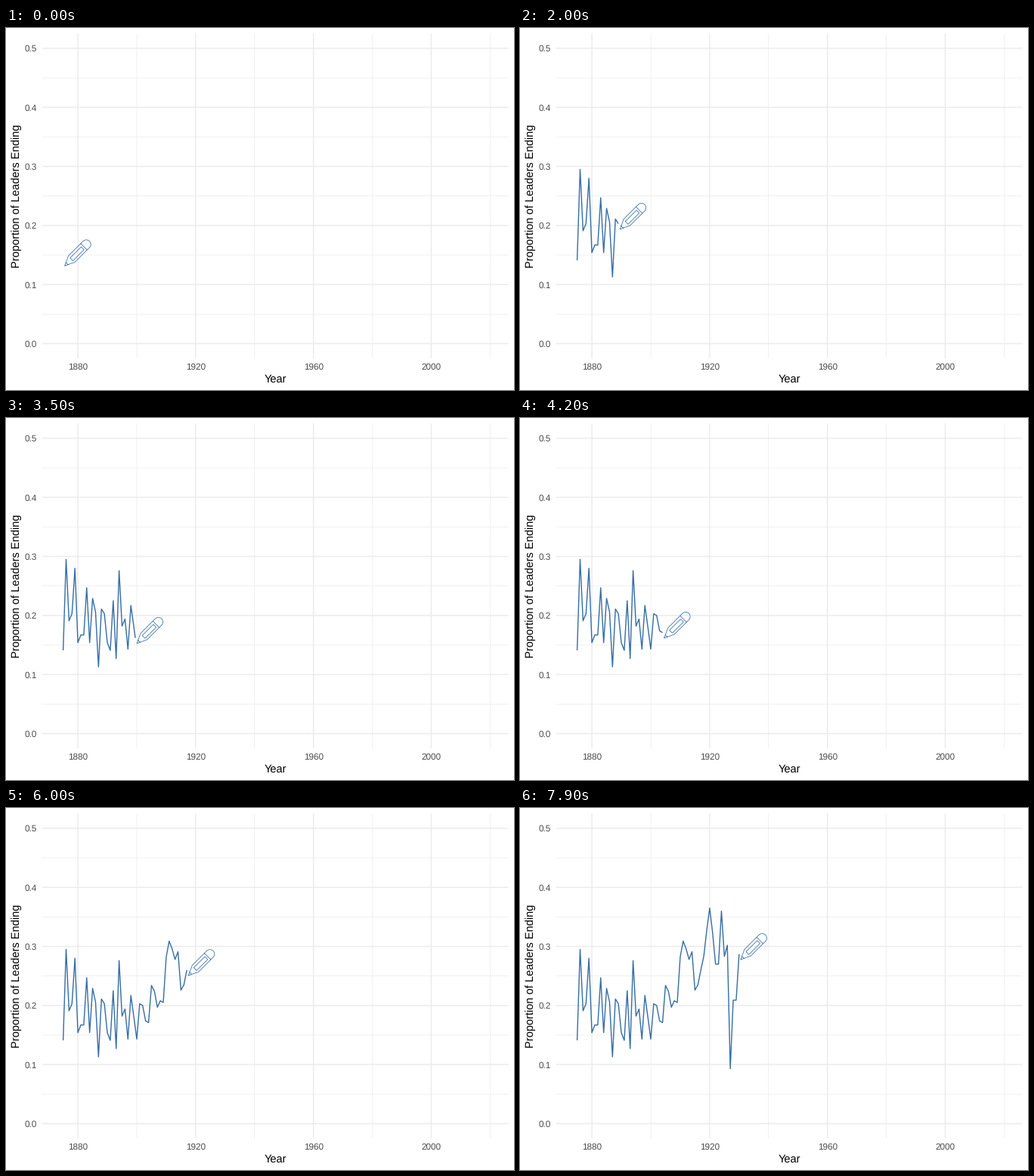
These frames come from a looping animation (672x480 px, 8000 ms). A matplotlib script:

```python
import numpy as np
import matplotlib
import matplotlib.pyplot as plt
from matplotlib.animation import FuncAnimation
from matplotlib.patches import PathPatch
from matplotlib.path import Path
from matplotlib.transforms import Affine2D

W, H, DPI = 672, 480, 96
FRAMES, STEP = 80, 100
FRAMES_PER_YEAR = 1.4317
LEFT, RIGHT, TOP, BOTTOM = 47.6, 664.7, 7.3, 438.1
START = 1875
BLUE, GRID, LABEL = "#386fa6", "#ebebeb", "#4d4d4d"

matplotlib.rcParams["font.family"] = "Liberation Sans"
matplotlib.rcParams["text.hinting"] = "none"
matplotlib.rcParams["path.simplify"] = False

# Yearly proportions in thousandths, from 1875 on
RATES = np.array([
    141, 295, 191, 203, 280, 154, 167, 167, 247, 154,
    229, 206, 113, 211, 203, 154, 141, 225, 127, 276,
    182, 194, 143, 217, 181, 143, 203, 200, 174, 171,
    234, 224, 197, 208, 205, 282, 309, 296, 278, 291,
    226, 235, 260, 283, 327, 365, 323, 270, 270, 360,
    283, 302, 93, 209, 209, 287,
]) / 1000


def px(year):
    return 75.6 + 3.8952 * (year - START)


def py(rate):
    return 418.5 - 783.2 * rate


def pt(pixels):
    return pixels * 72 / DPI


fig = plt.figure(figsize=(W / DPI, H / DPI), dpi=DPI, facecolor="white")
ax = fig.add_axes([0, 0, 1, 1])
ax.set_xlim(0, W)
ax.set_ylim(H, 0)
ax.axis("off")


def rule(xs, ys, width):
    ax.plot(xs, ys, color=GRID, lw=pt(width), solid_capstyle="butt",
            snap=False, zorder=1)


def label(x, y, text, size=8.8, color=LABEL, ha="center", angle=0):
    ax.text(x, y, text, fontsize=size, color=color, ha=ha, va="baseline",
            rotation=angle, rotation_mode="anchor")


for i in range(10):
    rate = i * 0.05 + 0.05 * (i % 2 == 0) * 0
    rule([LEFT, RIGHT], [py(rate)] * 2, 0.71 if i % 2 else 1.42)
rule([LEFT, RIGHT], [py(0.5)] * 2, 1.42)
for i, year in enumerate(range(1880, 2021, 20)):
    rule([px(year)] * 2, [TOP, BOTTOM], 0.71 if i % 2 else 1.42)

for i in range(6):
    label(41.1, py(i / 10) + 4.2, f"{i / 10:.1f}", ha="right")
for year in range(1880, 2001, 40):
    label(px(year), 453.1, str(year))
label((LEFT + RIGHT) / 2, 469.5, "Year", 11, "black")
label(17.9, (TOP + BOTTOM) / 2, "Proportion of Leaders Ending", 11, "black",
      angle=90)


def pencil_path():
    """Pencil outline along +x with its tip at the origin."""
    r, neck, cap, end = 6, 13, 36, 40.4
    a = np.linspace(np.pi / 2, -np.pi / 2, 25)
    dome = np.column_stack([end + r * np.cos(a), r * np.sin(a)])
    body = Path.make_compound_path(
        Path([(0, 0), (4.6, 2.1), (9.5, 4.2), (neck, r)],
             [Path.MOVETO, Path.LINETO, Path.CURVE3, Path.CURVE3]),
        Path(np.vstack([[(neck, r)], dome, [(neck, -r)]])),
        Path([(neck, -r), (9.5, -4.2), (4.6, -2.1), (0, 0)],
             [Path.MOVETO, Path.CURVE3, Path.CURVE3, Path.LINETO]),
        Path([(4.6, 2.1), (4.1, 0), (4.6, -2.1)]),
        Path([(cap, r), (cap, -r)]),
        Path([(12.5, 2.4), (33.4, 2.4), (33.4, -2.9), (12.5, -2.9),
              (12.5, 2.4)]),
    )
    return body.transformed(Affine2D().rotate_deg(45).scale(1, -1))


line, = ax.plot([], [], color=BLUE, lw=pt(1.42), solid_capstyle="butt",
                solid_joinstyle="round", snap=False, zorder=3)
pencil = PathPatch(pencil_path(), facecolor="none", edgecolor=BLUE,
                   lw=pt(0.8), snap=False, zorder=4)
ax.add_patch(pencil)

years = np.arange(len(RATES))
keys = np.round(years * FRAMES_PER_YEAR)
xs, ys = px(START + years), py(RATES)


def draw(frame):
    x, y = np.interp(frame, keys, xs), np.interp(frame, keys, ys)
    past = keys <= frame
    line.set_data(np.append(xs[past], x), np.append(ys[past], y))
    pencil.set_transform(Affine2D().translate(x + 2, y + 7.4) + ax.transData)
    return line, pencil


anim = FuncAnimation(fig, draw, frames=FRAMES, interval=STEP, repeat=True,
                     repeat_delay=0, blit=False)
plt.show()
```
